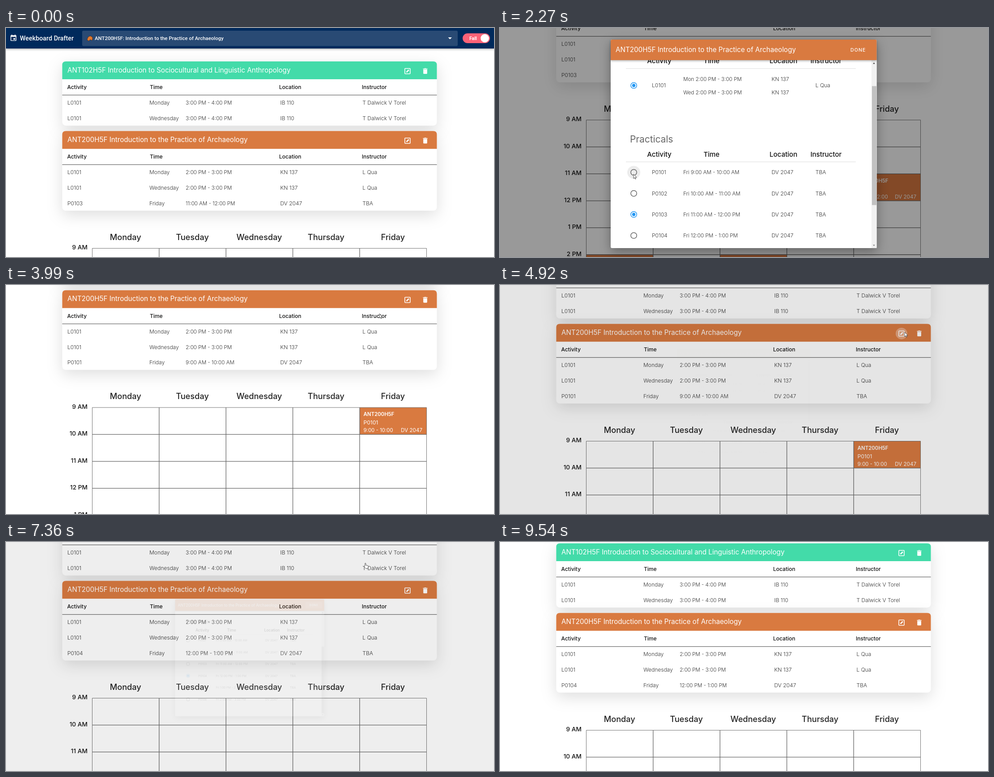
An HTML page for the animation above (9.85 s loop, 1089 px wide and 514 px high).

```html
<!DOCTYPE html>
<html lang="en">
<head>
<meta charset="utf-8">
<title>Course timetable</title>
<style>
html, body { margin: 0; width: 100%; height: 100%; overflow: hidden; background: #fff; }
svg { display: block; font-family: Inter, "Open Sans", sans-serif; }
.bar { font-family: Roboto, sans-serif; }
.card { filter: drop-shadow(0 10px 17px rgba(0,0,0,.13)); }
.low { filter: drop-shadow(0 2px 2px rgba(0,0,0,.3)); }
.dialog { filter: drop-shadow(0 8px 12px rgba(0,0,0,.35)); }
</style>
</head>
<body>
<svg id="stage" width="1089" height="514" viewBox="0 0 1089 514"></svg>
<script>
const LOOP = 9850, STEP = 78.2, PHASE = 1250;
const ORANGE = '#d97a40', GREEN = '#43dba9', BLUE = '#2196f3';
const COURSE = 'ANT200H5F', TITLE = COURSE + ' Introduction to the Practice of Archaeology';
const DAYS = ['Monday', 'Tuesday', 'Wednesday', 'Thursday', 'Friday'];
const GRID = { x: 192.5, y: 494.5, w: 149.2, h: 60.45 };
const TITLE_SIZE = 15.2, TIME_SIZE = 11.6;
const DIALOG_SCROLL_MAX = 206;

// Tracks are [time, value, ...] rows, eased between neighbours.
const pageScroll = [[230, 0], [1100, 288], [3600, 288], [4400, 144], [7480, 144], [7900, 288], [8980, 288], [9300, 72]];
const dialogScroll = [[1640, 0], [1900, 72], [3600, 72], [3601, 0], [5230, 0], [5600, DIALOG_SCROLL_MAX]];
const pointer = [[700, 1100, 530], [1170, 835, 372], [1328, 814, 407], [2190, 300, 337], [2270, 298, 328],
  [2500, 298, 328], [3120, 800, 48], [3361, 802, 46], [3600, 802, 46], [4650, 903, 106], [5000, 903, 106],
  [5630, 500, 358], [5710, 470, 356], [5860, 281, 346], [5950, 281, 346], [6180, 298, 333], [6330, 298, 333],
  [6720, 890, 95], [6965, 801, 49], [7350, 799, 47], [7500, 799, 47], [7900, 791, 141], [8230, 791, 141], [8610, 1040, 526]];
// Overlay and dialog each have their own opening and closing times.
const overlayTimes = [[1303, 3264], [4897, 7216]];
const dialogTimes = [[1313, 3070], [4925, 7198]];

const clamp = v => Math.min(1, Math.max(0, v));
const easeOut = u => 1 - (1 - clamp(u)) ** 3;

function track(rows, t, col = 1) {
  const next = rows.findIndex(r => r[0] > t);
  if (next === 0) return rows[0][col];
  if (next < 0) return rows[rows.length - 1][col];
  const a = rows[next - 1], b = rows[next];
  const u = (t - a[0]) / (b[0] - a[0]);
  return a[col] + (b[col] - a[col]) * u * u * (3 - 2 * u);
}

const presence = (spans, t) => spans.reduce((sum, [open, close]) =>
  sum + easeOut((t - open) / 300) - easeOut((t - close) / 300), 0);

const text = (x, y, s, size = 12, weight = 300, fill = '#333', anchor = 'start') =>
  `<text x="${x}" y="${y}" font-size="${size}" font-weight="${weight}" fill="${fill}" text-anchor="${anchor}">${s}</text>`;
const rect = (x, y, w, h, fill, extra = '') =>
  `<rect x="${x}" y="${y}" width="${w}" height="${h}" fill="${fill}" ${extra}/>`;
const circle = (x, y, r, fill, extra = '') => `<circle cx="${x}" cy="${y}" r="${r}" fill="${fill}" ${extra}/>`;
const path = (d, fill, extra = '') => `<path d="${d}" fill="${fill}" ${extra}/>`;
const move = (x, y, body) => `<g transform="translate(${x} ${y})">${body}</g>`;
const icon = (x, y, d) => path(d, '#fff', `transform="translate(${x} ${y}) scale(.72)"`);

const hour = h => `${(h - 1) % 12 + 1}:00`;
const clock = h => `${hour(h)} ${h < 12 ? 'AM' : 'PM'}`;
const span = h => `${clock(h)} - ${clock(h + 1)}`;
const practical = i => 'P010' + (i + 1);

function appBar() {
  return `<g class="bar">` + rect(0, 0, 1089, 46, '#002a5c', 'class="low"') +
    icon(8, 14, 'M17 12h-5v5h5zM16 1v2H8V1H6v2H5a2 2 0 0 0-2 2v14a2 2 0 0 0 2 2h14a2 2 0 0 0 2-2V5a2 2 0 0 0-2-2h-1V1zM19 19H5V8h14z') +
    text(31, 28, 'Weekboard Drafter', 14.3, 500, '#fff') +
    rect(170, 6, 838, 34.5, '#294a74', 'rx="3"') +
    path('M181 27q1-9 8-9l4 3q1 5-2 7l-3-2-3 3z', '#e0782f', 'stroke="#4a2a18" stroke-width=".8"') +
    text(198, 27, TITLE.replace(COURSE, COURSE + ':'), 11.4, 500, '#fff') +
    path('M986.5 21h8.5l-4.25 4.3z', '#fff') +
    rect(1019, 12, 61, 22, '#fb6277', 'rx="11"') +
    text(1034, 26.7, 'Fall', 10.5, 700, '#fff') + circle(1068.5, 23, 9.3, '#fff') + '</g>';
}

function card(top, color, title, rows, ripple) {
  const bottom = 75 + 34.6 * rows.length;
  const body = `<g class="card">` + rect(125.5, 0, 836, bottom, '#fff', 'rx="8"') + '</g>' +
    path('M125.5 40V8q0-8 8-8H953.5q8 0 8 8V40z', color) +
    text(137, 24.5, title, TITLE_SIZE, 400, '#fff') +
    (ripple ? circle(896, 21.7, 13, '#fff', `opacity="${ripple}"`) : '') +
    rect(890, 15.8, 12, 12, 'none', 'rx="1" stroke="#fff" stroke-width="1.6"') +
    path('M893.2 24.8v-2l4.7-4.7 2 2-4.7 4.7z', '#fff') +
    icon(926.9, 13, 'M6 19a2 2 0 0 0 2 2h8a2 2 0 0 0 2-2V7H6zM19 4h-3.5l-1-1h-5l-1 1H5v2h14z') +
    [[136.5, 'Activity'], [321, 'Time'], [609.5, 'Location'], [794, 'Instructor']]
      .map(([x, s]) => text(x, 62, s, 12, 500, '#111')).join('') +
    rect(125.5, 75, 836, 1, '#444') +
    rows.map((row, i) => [137, 320, 401, 612, 795.5]
      .map((x, j) => text(x, 97.3 + 34.6 * i, row[j], j === 2 ? TIME_SIZE : 12)).join('')).join('');
  return move(0, top, body);
}

function block(day, start, label, room) {
  return move(GRID.x + day * GRID.w, GRID.y + (start - 9) * GRID.h,
    rect(0, 0, GRID.w, GRID.h, ORANGE) +
    text(8.5, 19.5, COURSE, 11.4, 600, '#fff') + text(8.5, 38, label, 12, 400, '#fff') +
    text(8.5, 55.5, `${hour(start)} - ${hour(start + 1)}`, 11.4, 400, '#fff') +
    text(139.7, 55.5, room, TIME_SIZE, 400, '#fff', 'end'));
}

function calendar(choice) {
  const right = GRID.x + 5 * GRID.w;
  let out = block(0, 14, 'L0101', 'KN 137') + block(2, 14, 'L0101', 'KN 137') +
    block(4, 9 + choice, practical(choice), 'DV 2047');
  for (let i = 0; i < 7; i++) {
    const y = GRID.y + i * GRID.h;
    out += path(`M${GRID.x} ${y}H${right}`, 'none', `stroke="#666" stroke-width="${i ? 1.3 : .9}"`) +
      text(182, y + 2.8, clock(9 + i).replace(':00', ''), 13.7, 500, '#111', 'end');
  }
  for (let i = 0; i < 6; i++) {
    const x = GRID.x + i * GRID.w;
    out += path(`M${x} ${GRID.y}v430`, 'none', `stroke="#666" stroke-width="${i % 5 ? 1.3 : .9}"`);
  }
  return out + DAYS.map((d, i) => text(GRID.x + (i + .5) * GRID.w - .4, 476, d, 18.1, 500, '#222', 'middle')).join('');
}

function page(choice, ripple) {
  const row = (activity, day, start, room, who) => [activity, day, span(start), room, who];
  const lectures = (start, room, who) => ['Monday', 'Wednesday'].map(d => row('L0101', d, start, room, who));
  return appBar() +
    card(75, GREEN, 'ANT102H5F Introduction to Sociocultural and Linguistic Anthropology',
      lectures(15, 'IB 110', 'T Dalwick V Torel'), 0) +
    card(231.2, ORANGE, TITLE, [...lectures(14, 'KN 137', 'L Qua'),
      row(practical(choice), 'Friday', 9 + choice, 'DV 2047', 'TBA')], ripple) +
    calendar(choice);
}

function radio(y, on, hover) {
  const color = on ? BLUE : '#666';
  return (hover ? circle(298.5, y, 14.5, color, 'opacity=".12"') : '') +
    circle(298.5, y, 6.6, 'none', `stroke="${color}" stroke-width="1.5"`) +
    (on ? circle(298.5, y, 3.7, color) : '');
}

function section(y, name) {
  return text(290, y + 7.5, name, 20.8, 400, '#666') +
    [[355.5, 'Activity'], [472, 'Time'], [632.5, 'Location'], [727.5, 'Instructor']]
      .map(([x, s]) => text(x, y + 39.3, s, 15, 500, '#111', 'middle')).join('') +
    rect(281, y + 50.5, 513, 1, '#ddd');
}

function dialog(shown, picked, scroll, mx, my, hoverDone) {
  const hovered = y => Math.hypot(mx - 298.5, my - (y - scroll)) < 9;
  const slot = (y, day, start, room) =>
    text(409, y, `${day} ${span(start)}`, TIME_SIZE) + text(606, y, room);
  let list = section(112, 'Lectures') + radio(201, true, false) + text(339, 205, 'L0101') +
    slot(191, 'Mon', 14, 'KN 137') + slot(220.5, 'Wed', 14, 'KN 137') + text(704, 205, 'L Qua') +
    section(321.5, 'Practicals');
  for (let i = 0; i < 6; i++) {
    const y = 396 + 47.25 * i;
    list += radio(y, i === picked, hovered(y)) + text(339, y + 4.3, practical(i)) +
      slot(y + 4.3, 'Fri', 9 + i, 'DV 2047') + text(704, y + 4.3, 'TBA');
  }
  const thumb = 85 + 130 * scroll / DIALOG_SCROLL_MAX;
  return `<g opacity="${shown}" transform="translate(543.7 260) scale(${.5 + .5 * shown}) translate(-543.7 -260)">
    <clipPath id="view"><rect x="247" y="72" width="582" height="422"/></clipPath>` +
    `<g class="dialog">` + rect(247, 26, 593.5, 468, '#fff', 'rx="3"') + '</g>' +
    `<g clip-path="url(#view)">${move(0, -scroll, list)}</g>` +
    rect(829, 72, 11.5, 422, '#f1f1f1') + rect(830, thumb, 10, 267, '#c1c1c1') +
    path('M832 80.5h5l-2.5-3z', '#444') + path('M832 486.5h5l-2.5 3z', '#888') +
    path('M247 72V29q0-3 3-3H837.5q3 0 3 3V72z', ORANGE, 'class="low"') +
    text(258, 54.3, TITLE, TITLE_SIZE, 400, '#fff') +
    (hoverDone ? rect(766, 37, 66, 25, '#fff', 'rx="3" opacity=".14"') : '') +
    `<g letter-spacing="1.1">${text(782, 53, 'DONE', 10.6, 500, '#fff')}</g></g>`;
}

function cursor(x, y, hand) {
  const shape = hand
    ? 'M2 7V1q1-1.6 2 0V5l4 .8q1.6.4 1.4 2L8.7 12.5H4L0 8.3Q.5 6.5 2 7z'
    : 'M0 0V9.8L2.2 7.8 3.8 11.2 5.3 10.5 3.8 7.2H6.9z';
  return move(x, y, path(shape, '#fff', 'stroke="#333" stroke-width=".8" stroke-linejoin="round"'));
}

function render(t) {
  const saved = t < 3150 ? 2 : t < 7198 ? 0 : 3;
  const picked = t < 2420 ? 2 : t < 6240 ? 0 : 3;
  const x = track(pointer, t), y = track(pointer, t, 2);
  const overlay = presence(overlayTimes, t), shown = presence(dialogTimes, t);
  const ripple = t > 4560 && t < 7198 ? .33 : 0;
  const hoverDone = x > 766 && x < 832 && y > 37 && y < 62;
  return move(0, -track(pageScroll, t), page(saved, ripple)) +
    (overlay > .002 ? rect(0, 0, 1089, 514, '#000', `opacity="${.4 * overlay}"`) : '') +
    (shown > .002 ? dialog(shown, picked, track(dialogScroll, t), x, y, hoverDone) : '') +
    cursor(x, y, hoverDone && t > 6900);
}

const stage = document.getElementById('stage');
let last = null;
function tick() {
  const now = performance.now() % LOOP;
  const t = PHASE + STEP * Math.floor((now - PHASE + 12) / STEP);
  if (t !== last) stage.innerHTML = render(last = t);
  requestAnimationFrame(tick);
}
tick();
</script>
</body>
</html>
```
